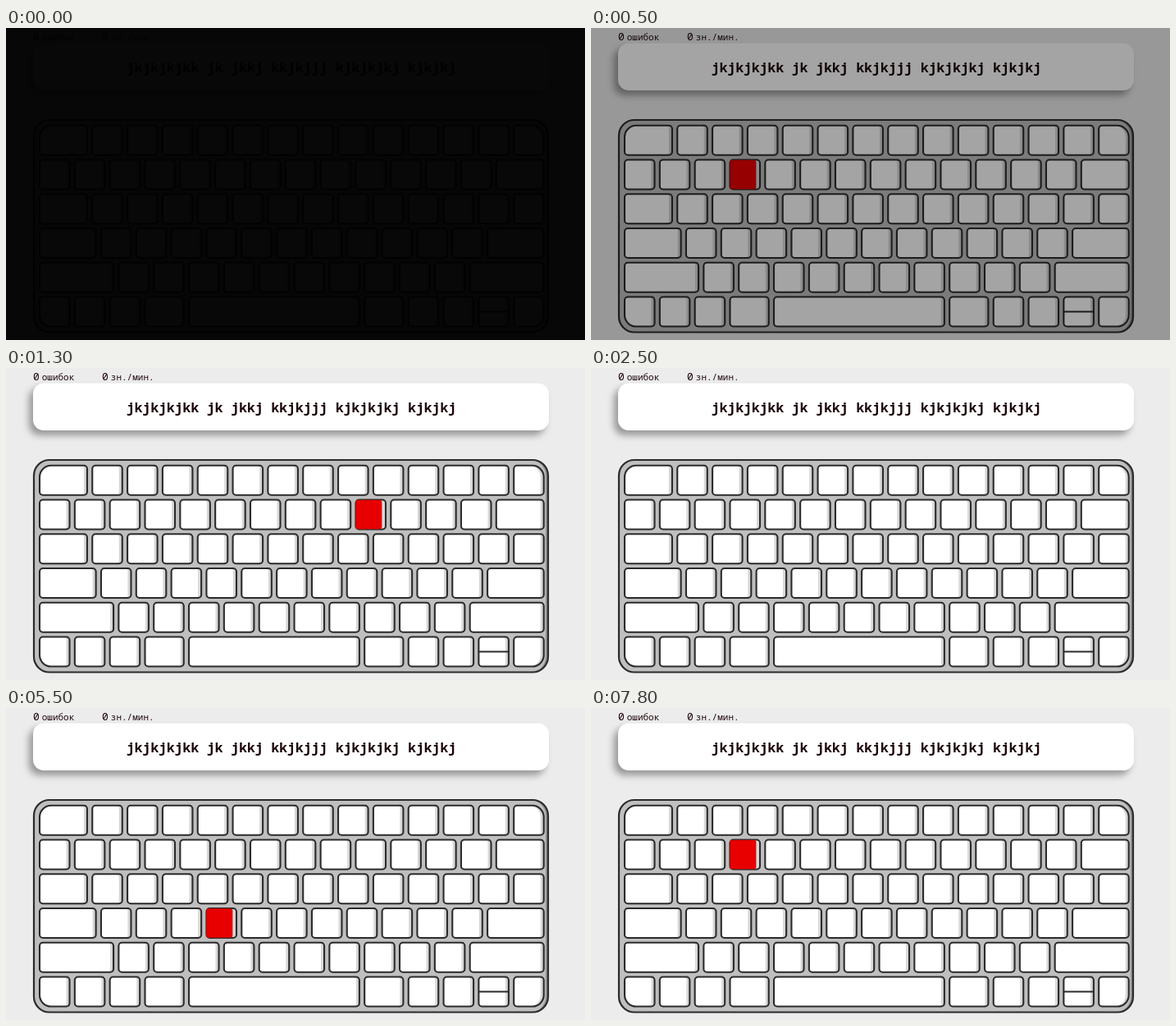
Animation, 706 px wide and 380 px high, one loop 8000 ms. Source, as an HTML page with a canvas:

```html
<!DOCTYPE html>
<html lang="ru">
<head>
<meta charset="utf-8">
<style>
html, body { margin: 0; width: 100%; height: 100%; overflow: hidden; background: #ececec; }
canvas { display: block; }
</style>
</head>
<body>
<canvas id="stage" width="706" height="380"></canvas>
<script>
const ctx = document.getElementById('stage').getContext('2d');
const LOOP = 8000, STEP = 100;
const UNIT = 42.83, PITCH = 41.75, GAP = 6.3, KEY_H = 36;
const LEFT = 41, TOP = 118.8;
const INK = '#2b2b2b';
const MONO = '"Noto Sans Mono", "DejaVu Sans Mono", monospace';

const ones = n => Array(n).fill(1);
const rows = [
  [1.5, ...ones(13)],
  [...ones(13), 1.5],
  [1.5, ...ones(13)],
  [1.75, ...ones(11), 1.75],
  [2.25, ...ones(10), 2.25],
  [1, 1, 1, 1.25, 5, 1.25, 1, 1, 1, 1]
];

const keys = rows.map((widths, r) => {
  let pos = 0;
  return widths.map((u, i) => {
    const key = { x: LEFT + pos * UNIT, y: TOP + r * PITCH, w: u * UNIT - GAP, radii: [4, 4, 4, 4] };
    pos += u;
    const last = i === widths.length - 1;
    if (r === 0 && i === 0) key.radii[0] = 14;
    if (r === 0 && last) key.radii[1] = 14;
    if (r === 5 && last) key.radii[2] = 14;
    if (r === 5 && i === 0) key.radii[3] = 14;
    return key;
  });
});

// Presses: row, key, start, end
const presses = [
  [1, 2, 200, 500], [1, 3, 500, 900], [1, 4, 700, 1000],
  [1, 10, 1600, 1800], [1, 11, 1800, 2100],
  [3, 5, 3200, 3300], [3, 4, 3300, 3500], [3, 3, 3500, 3800],
  [3, 4, 5500, 6300],
  [2, 2, 6500, 6600], [2, 3, 6600, 6800],
  [2, 9, 7300, 7500], [1, 3, 7800, 8000]
];

function sweep(row, from, to, start, step) {
  const dir = Math.sign(to - from);
  for (let i = 0; i <= Math.abs(to - from); i++) {
    const t = start + i * step;
    presses.push([row, from + i * dir, t, t + step]);
  }
}
sweep(1, 5, 9, 900, 100);
sweep(3, 10, 6, 2600, 120);
sweep(2, 2, 10, 4200, 89);
sweep(2, 4, 8, 6800, 100);

function path(x, y, w, h, r) {
  ctx.beginPath();
  ctx.roundRect(x, y, w, h, r);
}

function text(str, x, y, size, weight = 400, align = 'left') {
  ctx.font = `${weight} ${size}px ${MONO}`;
  ctx.textAlign = align;
  ctx.fillText(str, x, y);
}

function drawHeader() {
  ctx.fillStyle = '#1c0509';
  text('0', 33, 15, 13);
  text('ошибок', 43.7, 15, 11);
  text('0', 117, 15, 13);
  text('зн./мин.', 127.8, 15, 11);

  ctx.save();
  ctx.shadowColor = 'rgba(0,0,0,.36)';
  ctx.shadowOffsetX = -5;
  ctx.shadowOffsetY = 6;
  ctx.shadowBlur = 8;
  ctx.fillStyle = '#fff';
  path(33, 18.5, 629, 57.5, 13);
  ctx.fill();
  ctx.restore();

  ctx.fillStyle = '#1c0509';
  text('jkjkjkjkk jk jkkj kkjkjjj kjkjkjkj kjkjkj', 348, 53.5, 16.35, 600, 'center');
}

function drawCase() {
  path(34, 112, 627, 258.5, 19);
  ctx.save();
  ctx.clip();
  ctx.fillStyle = '#929292';
  ctx.fillRect(30, 108, 640, 270);
  ctx.fillStyle = '#bfbfbf';
  path(30, 112, 628, 258.5, 19);
  ctx.fill();
  ctx.restore();
  path(34, 112, 627, 258.5, 19);
  ctx.strokeStyle = INK;
  ctx.lineWidth = 2.2;
  ctx.stroke();
}

function drawKey({ x, y, w, radii }) {
  path(x, y, w, KEY_H, radii);
  ctx.save();
  ctx.clip();
  ctx.fillStyle = '#d8d8d8';
  ctx.fillRect(x, y, w, KEY_H);
  ctx.fillStyle = '#fff';
  path(x - 4, y, w, KEY_H, radii);
  ctx.fill();
  ctx.restore();
  path(x, y, w, KEY_H, radii);
  ctx.stroke();
}

function drawPress({ x, y, w }) {
  ctx.fillStyle = '#e80000';
  path(x, y + 0.2, w - 4.5, KEY_H - 0.4, 3);
  ctx.fill();
}

function draw(t) {
  ctx.fillStyle = '#ececec';
  ctx.fillRect(0, 0, 706, 380);
  drawHeader();
  drawCase();
  ctx.lineWidth = 2.1;
  keys.flat().forEach(drawKey);

  const arrow = keys[5][8];
  ctx.beginPath();
  ctx.moveTo(arrow.x, arrow.y + KEY_H / 2);
  ctx.lineTo(arrow.x + arrow.w, arrow.y + KEY_H / 2);
  ctx.stroke();

  for (const [r, i, start, end] of presses) {
    if (t >= start && t < end) drawPress(keys[r][i]);
  }

  const light = Math.min(1, 0.03 + t * 0.00123);
  if (light < 1) {
    ctx.fillStyle = `rgba(0,0,0,${1 - light})`;
    ctx.fillRect(0, 0, 706, 380);
  }
}

const origin = performance.now();
function tick() {
  const t = (performance.now() - origin) % LOOP;
  draw(Math.floor(t / STEP) * STEP);
  requestAnimationFrame(tick);
}
tick();
</script>
</body>
</html>
```
